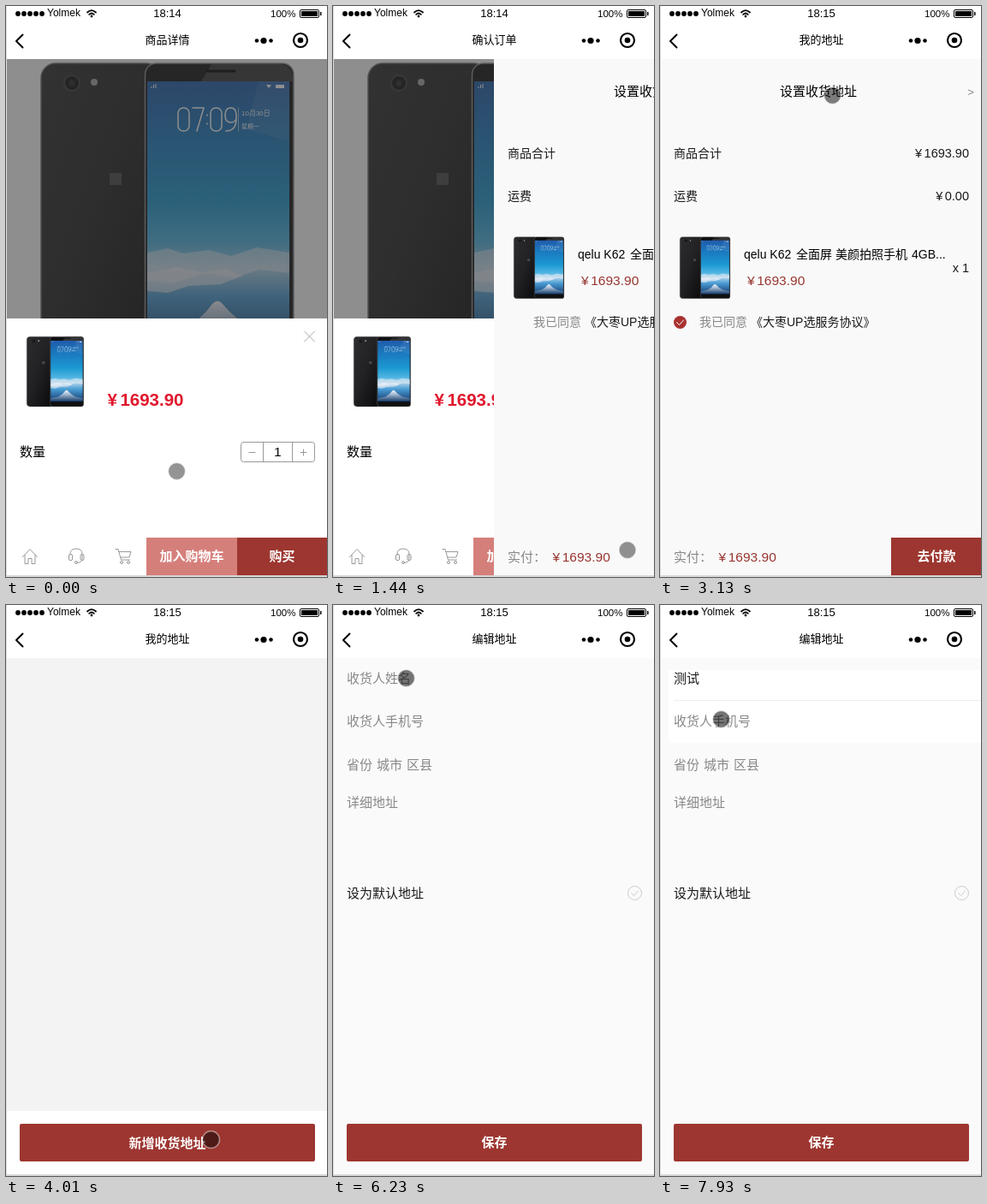
These frames come from a looping animation (375x667 px, 8000 ms). An HTML page:

```html
<!DOCTYPE html>
<html lang="zh-CN">
<head>
<meta charset="utf-8">
<title>商品购买流程</title>
<style>
  html, body { margin: 0; width: 100%; height: 100%; overflow: hidden; background: #fff; }
  svg { display: block; }
  text { font-family: "Liberation Sans", "Noto Sans CJK SC", "Noto Sans CJK", sans-serif; white-space: pre; }
  .line { fill: none; stroke-linecap: round; stroke-linejoin: round; }
</style>
</head>
<body>
<svg id="stage" width="375" height="667" viewBox="0 0 375 667">
  <defs>
    <linearGradient id="back" x2="1" y2="1">
      <stop stop-color="#2c2c2e"/><stop offset=".45" stop-color="#222224"/><stop offset="1" stop-color="#08080a"/>
    </linearGradient>
    <linearGradient id="sky" x2="0" y2="1">
      <stop stop-color="#1f5cab"/><stop offset=".2" stop-color="#1a78be"/>
      <stop offset=".45" stop-color="#1c98d2"/><stop offset=".6" stop-color="#4db4e2"/>
      <stop offset=".7" stop-color="#a8d0e8"/><stop offset=".8" stop-color="#4a9cd4"/>
      <stop offset="1" stop-color="#123a70"/>
    </linearGradient>
    <linearGradient id="peak" x2="0" y2="1">
      <stop stop-color="#f4f6fa"/><stop offset=".3" stop-color="#b4c8de"/><stop offset="1" stop-color="#173e6c"/>
    </linearGradient>
    <clipPath id="photo"><rect x="1" y="62" width="374" height="303"/></clipPath>
    <g id="phone">
      <rect x="1" y="1" width="140" height="362" rx="17" fill="url(#back)" stroke="#6c6c6e" stroke-width="1.500"/>
      <circle cx="37" cy="24" r="9" fill="#0d0d0f" stroke="#3c3c3e" stroke-width="2"/>
      <circle cx="37" cy="24" r="3.500" fill="#24242c"/>
      <circle cx="63" cy="23" r="4" fill="#a5a5a3"/>
      <rect x="81" y="129" width="14" height="14" fill="#48484a"/>
      <rect x="122.500" y="1" width="173.500" height="362" rx="13" fill="#101012" stroke="#8a8a8c" stroke-width="1.500"/>
      <path d="M200 2h80q13 0 15 15v5H188z" fill="#343436"/>
      <path d="M195 10h32" class="line" stroke="#000" stroke-width="3"/>
      <rect x="125" y="22" width="166" height="314" fill="url(#sky)"/>
      <path d="M255 22h36v70l-50-14z" fill="#fff" opacity=".07"/>
      <path d="M125 222l24-5 18 6 30-4 26 7 30-10 38 6v24l-36-4-28 10-32-6-40 12-30-3z" fill="#f4f4fa" opacity=".5"/>
      <path d="M125 246l34-7 30 6 28-4 20 8-26 10-38 2-24 8-24-2z" fill="#f4f4fa" opacity=".6"/>
      <path d="M125 336v-16l40-8q22-10 36-30 6-7 12 0 16 20 40 30l38 8v16z" fill="url(#peak)"/>
      <path d="M130 30v-2m2.500 2v-4m2.500 4v-5" stroke="#fff"/>
      <path d="M264 26l3 4 3-4z" fill="#fff"/><rect x="275" y="26" width="10" height="4" fill="#fff"/>
      <g class="line" stroke="#fff" stroke-width="1.500">
        <rect x="161" y="53" width="13" height="27" rx="6"/>
        <path d="M178 53h13l-8 27M195 61v1m0 9v1"/>
        <rect x="199" y="53" width="13" height="27" rx="6"/>
        <path d="M229 66q-2 4-6.500 4-6.500 0-6.500-8.500 0-8.500 6.500-8.500t6.500 8.500v4q0 14.500-12 14.500"/>
        <path d="M231.500 53v27" stroke-width=".6"/>
      </g>
      <text x="235" y="62" font-size="8" fill="#fff">10月30日</text>
      <text x="235" y="77" font-size="7" fill="#fff">星期一</text>
    </g>
    <g id="bar"><rect x="16" y="606" width="345" height="44" rx="2" fill="#9d3630"/></g>
  </defs>

  <rect width="375" height="667" fill="#fff"/>

  <g id="goods">
    <g clip-path="url(#photo)">
      <use href="#phone" x="40" y="66"/>
      <rect y="62" width="375" height="303" fill="#383838" fill-opacity=".565"/>
    </g>
    <use href="#phone" transform="translate(24 386) scale(.2256)"/>
    <path d="M348.500 380l12 12m0-12l-12 12" class="line" stroke="#aaa"/>
    <g class="line" stroke="#999">
      <rect x="274.500" y="509.500" width="86" height="23" rx="3"/>
      <path d="M300.500 510v22m34-22v22M284 521.500h7m53 0h7m-3.500-3.500v7"/>
    </g>
    <g class="line" stroke="#999">
      <path d="M19.500 643.500l8.500-9 8.500 9M22 641.500v10h4v-6h4v6h4v-10"/>
      <path d="M75 641v-1q0-6 7-6t7 6v6q0 4-6 4.500"/>
      <rect x="73.500" y="640.500" width="4" height="7" rx="1.500"/>
      <rect x="87" y="640.500" width="4" height="7" rx="1.500"/>
      <circle cx="82" cy="650" r="1.500"/>
      <path d="M128 634.500h3l3.500 12.500h10M132 637.500h14l-2 6.500h-10"/>
      <circle cx="135" cy="650" r="1.500"/><circle cx="143" cy="650" r="1.500"/>
    </g>
    <rect x="164" y="621" width="106" height="44" fill="#d57f7b"/>
    <rect x="270" y="621" width="105" height="44" fill="#9d3630"/>
  </g>

  <g id="order">
    <rect y="62" width="375" height="603" fill="#f9f9f9"/>
    <use href="#phone" transform="translate(23 269.500) scale(.199)"/>
    <g id="agreed">
      <circle cx="23.500" cy="369.500" r="7.500" fill="#a83230"/>
      <path d="M19.500 369.500l3 3 5-5.500" class="line" stroke="#fff"/>
    </g>
    <rect x="270" y="621" width="105" height="44" fill="#9d3630"/>
  </g>

  <g id="addresses">
    <rect y="62" width="375" height="529" fill="#f3f3f3"/>
    <rect y="591" width="375" height="74" fill="#fff"/>
    <use href="#bar"/>
  </g>

  <g id="edit">
    <rect y="62" width="375" height="603" fill="#fafafa"/>
    <g id="fields">
      <rect x="10" y="76" width="365" height="85" fill="#fff"/>
      <path d="M16 111.500h359" stroke="#eee"/>
    </g>
    <g class="line" stroke="#ccc">
      <circle cx="352.500" cy="336.500" r="8"/><path d="M348.500 336.500l3 3 5-5.500"/>
    </g>
    <use href="#bar"/>
    <rect id="caret" y="76" width="1" height="21" fill="#333"/>
  </g>

  <g id="head">
    <path d="M14 9h.01M21 9h.01M28 9h.01M35 9h.01M42 9h.01" class="line" stroke="#000" stroke-width="5.800"/>
    <g class="line" stroke="#000" stroke-width="1.800">
      <path d="M95 7.500q5-4.800 10 0M97.200 9.800q2.800-2.600 5.600 0"/><circle cx="100" cy="12" r=".5"/>
    </g>
    <rect x="343.500" y="4.500" width="22" height="9" rx="1.500" fill="none" stroke="#000"/>
    <path d="M345 6h19v6h-19zM367 7h1.500v4H367z"/>
    <path d="M19.500 33.500l-7.500 7.500 7.500 7.500" class="line" stroke="#000" stroke-width="2"/>
    <circle cx="293" cy="40.500" r="2.300"/><circle cx="301" cy="40.500" r="3.600"/><circle cx="309.500" cy="40.500" r="2.300"/>
    <circle cx="344" cy="40" r="8" fill="none" stroke="#000" stroke-width="2.200"/><circle cx="344" cy="40" r="3.300"/>
  </g>

  <circle id="pointer" r="10" fill="#000" stroke="#fff" stroke-opacity=".45" stroke-width="1.500"/>
  <path d="M.5 0v667" stroke="#ddd"/>
  <rect y="665" width="375" height="2" fill="#d6d6d6"/>
</svg>
<script>
const $ = id => document.getElementById(id);
const SVG = 'http://www.w3.org/2000/svg';
const DARK = '#1a1a1a', GREY = '#888', RED = '#983630';

// Adds a line of text whose glyphs are centred vertically on y.
function label(parent, str, x, y, size, fill = DARK, anchor = 'start', weight = 400) {
  const el = document.createElementNS(SVG, 'text');
  const attrs = { x, y: y + size * .365, 'font-size': size, fill, 'text-anchor': anchor, 'font-weight': weight };
  for (const k in attrs) el.setAttribute(k, attrs[k]);
  el.textContent = str;
  $(parent).append(el);
  return el;
}
const button = (parent, str, x, y) => label(parent, str, x, y, 15, '#fff', 'middle', 700);

// A currency sign, a thin gap, then the amount.
function price(parent, amount, x, y, size, ...style) {
  const digits = document.createElementNS(SVG, 'tspan');
  digits.setAttribute('dx', size * .17);
  digits.textContent = amount;
  label(parent, '¥', x, y, size, ...style).append(digits);
}

label('head', 'Yolmek', 48, 8, 12, '#000');
label('head', '100%', 309, 8.5, 11.5, '#000');
const clock = label('head', '', 188.5, 8, 13, '#000', 'middle');
const title = label('head', '', 188.5, 39.5, 13, '#000', 'middle');

price('goods', '1693.90', 118.5, 460, 20.5, '#e0182d', 'start', 700);
label('goods', '数量', 16, 521, 15, '#000');
label('goods', '1', 317.5, 521, 15, '#000', 'middle');
button('goods', '加入购物车', 217, 643);
button('goods', '购买', 322.5, 643);

label('order', '设置收货地址', 140, 100, 15, '#000');
const arrow = label('order', '>', 363, 100, 13, GREY, 'middle');
label('order', '商品合计', 16, 172, 14);
price('order', '1693.90', 361, 172, 14.5, DARK, 'end');
label('order', '运费', 16, 222, 14);
price('order', '0.00', 361, 222, 14.5, DARK, 'end');
[['qelu K62', 98], ['全面屏', 159], ['美颜拍照手机', 205], ['4GB...', 294]]
  .forEach(([str, x]) => label('order', str, x, 290, 14, '#000'));
price('order', '1693.90', 102, 320.5, 15.5, RED);
label('order', 'x 1', 361, 306, 14.5, DARK, 'end');
label('order', '我已同意', 46, 369, 14, GREY);
label('order', '《大枣UP选服务协议》', 106, 369, 14);
label('order', '实付：', 16, 643.5, 15, GREY);
price('order', '1693.90', 68.5, 643.5, 15.5, RED);
button('order', '去付款', 323, 643);

button('addresses', '新增收货地址', 188.5, 628.5);

const nameField = label('edit', '', 16, 86, 15);
[['收货人手机号', 16, 136], ['省份', 16, 187], ['城市', 51, 187], ['区县', 86, 187], ['详细地址', 16, 231]]
  .forEach(([str, x, y]) => label('edit', str, x, y, 15, GREY));
label('edit', '设为默认地址', 16, 336.5, 15);
button('edit', '保存', 188.5, 628);

const ticks = [
  [270, 630, 5], [990, 990, 1], [1350, 1620, 4], [1800, 1980, 3], [2340, 2770, 6], [3040, 3840, 10],
  [3920, 4270, 5], [4630, 4630, 1], [4900, 5610, 9], [5790, 5790, 1], [6230, 6230, 1], [6680, 6680, 1],
  [6860, 7220, 5], [7580, 7930, 5]
].flatMap(([a, b, n]) => Array.from({ length: n }, (_, i) => n > 1 ? a + (b - a) * i / (n - 1) : a));

// Pointer moves: [start, end, x, y]
const moves = [
  [0, 0, 199.5, 543.5], [180, 630, 344, 635.5], [1710, 1980, 262.5, 575.5], [2254, 2770, 202, 100],
  [2770, 3130, 201.5, 104.5], [3130, 3840, 206, 554], [3840, 4010, 239.5, 624.5], [4010, 4270, 241, 624.5],
  [4810, 5610, 85.5, 85.5], [7490, 7930, 71.5, 133.5]
];
const titles = [[0, '商品详情'], [990, '确认订单'], [3040, '我的地址'], [4630, '编辑地址']];
const shades = [[0, .42], [1800, .46], [3040, .5], [5610, .54]];
const typed = [[0, ''], [6680, 'c'], [6860, 'ce'], [6950, 'ces'], [7040, 'cesh'], [7130, 'ceshi'], [7220, '测试']];
const pages = [['order', 1290], ['addresses', 3340], ['edit', 4930]];

const clamp = p => Math.min(1, Math.max(0, p));
const ease = (p, n) => p < .5 ? (2 * p) ** n / 2 : 1 - (2 - 2 * p) ** n / 2;
const at = (table, t) => table.filter(row => row[0] <= t + .5).pop()[1];

function pointerAt(t) {
  let [, , x, y] = moves[0];
  for (const [a, b, nx, ny] of moves.slice(1)) {
    if (t <= a) break;
    const p = ease(clamp((t - a) / (b - a)), 4);
    x += (nx - x) * p;
    y += (ny - y) * p;
  }
  return [x, y];
}

function draw(time) {
  const t = ticks.filter(k => k <= time).pop() || 0;
  title.textContent = at(titles, t);
  clock.textContent = t < 3040 ? '18:14' : '18:15';
  arrow.setAttribute('opacity', t < 1800 ? 0 : 1);
  $('agreed').setAttribute('opacity', t < 1530 ? 0 : 1);

  for (const [id, start] of pages) {
    const x = Math.ceil(375 * (1 - ease(clamp((t - start) / 300), 3)));
    $(id).setAttribute('transform', `translate(${x} 0)`);
  }

  const str = at(typed, t);
  nameField.textContent = str || '收货人姓名';
  nameField.setAttribute('fill', str ? DARK : GREY);
  $('fields').setAttribute('opacity', str ? 1 : 0);
  const blink = t >= 5790 && t < 6230, typing = t >= 6680 && t < 7580;
  $('caret').setAttribute('opacity', blink || typing ? 1 : 0);
  $('caret').setAttribute('x', 16 + (str ? nameField.getComputedTextLength() : 0));

  const [x, y] = pointerAt(t);
  $('pointer').setAttribute('transform', `translate(${x} ${y})`);
  $('pointer').setAttribute('fill-opacity', at(shades, t));
}

const begin = performance.now();
function frame() {
  draw((performance.now() - begin) % 8000);
  requestAnimationFrame(frame);
}
frame();
</script>
</body>
</html>
```
